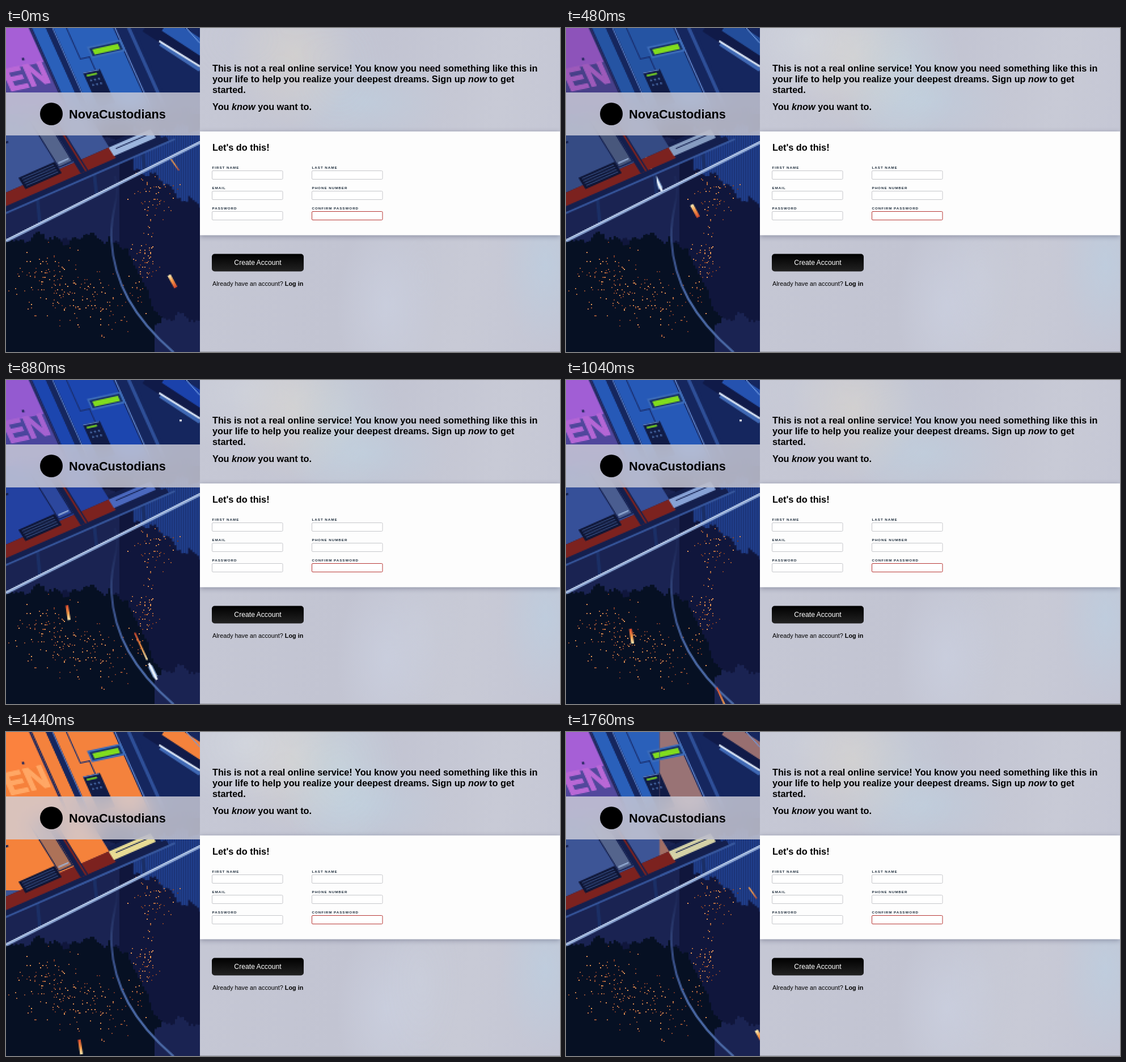
Write an HTML page with a canvas that moves like this. It is 977 by 573 pixels and loops after 1.84 s.

```html
<!DOCTYPE html>
<html lang="en">
<head>
<meta charset="utf-8">
<title>Sign up</title>
<style>
  html, body { margin: 0; width: 100%; height: 100%; overflow: hidden; }
  body { position: relative; background: #c3c5d2; }
  canvas, .banner, .back, .glow, svg { position: absolute; top: 0; left: 0; }
  canvas { width: 342px; height: 574px; image-rendering: pixelated; }
  .banner { top: 114px; width: 342px; height: 76px; background: #d2d3dccc; backdrop-filter: blur(16px); }
  .back, .glow { left: 342px; width: 635px; height: 573px; }
  .back {
    background:
      radial-gradient(ellipse 110px 130px at 165px 50px, #d5d1cdcc, transparent),
      radial-gradient(ellipse 150px 80px at 290px 130px, #bfcfdfaa, transparent),
      radial-gradient(ellipse 80px 150px at 610px 420px, #bccfe1aa, transparent),
      radial-gradient(ellipse 90px 150px at 330px 490px, #cacfdfcc, transparent),
      linear-gradient(100deg, #c6c8d5, #c2c4d2 45%, #c8cad6 75%, #c3c5d4);
  }
  .glow {
    background:
      radial-gradient(ellipse 150px 120px at 80px 20px, #d8dde3aa, transparent),
      radial-gradient(ellipse 110px 150px at 245px 70px, #c6d9e2aa, transparent),
      radial-gradient(ellipse 70px 150px at 390px 440px, #ced3e077, transparent);
  }
  svg { font-family: "Liberation Sans", Arial, sans-serif; }
  .bold { font-weight: 700; font-size: 16.27px; }
  .brand { font-weight: 700; font-size: 21.65px; }
  .label { font-weight: 700; font-size: 6.2px; letter-spacing: 1px; fill: #1c2b3a; }
  .field { fill: #fff; stroke: #c6c7cb; }
  .wrong { stroke: #b83836; }
  .panel { filter: drop-shadow(0 2px 5px #4a506877); }
</style>
</head>
<body>
<div class="back"></div>
<div class="glow" id="glow"></div>
<canvas id="scene" width="171" height="287"></canvas>
<div class="banner"></div>
<svg width="977" height="573" viewBox="0 0 977 573">
  <defs>
    <linearGradient id="black" x2="0" y2="1"><stop stop-color="#000"/><stop offset="1" stop-color="#222"/></linearGradient>
    <clipPath id="right"><path d="M342 170H977V390H342z"/></clipPath>
  </defs>
  <circle cx="80" cy="152" r="20"/>
  <text class="brand" x="111" y="160">NovaCustodians</text>
  <g class="bold">
    <text x="364" y="77">This is not a real online service! You know you need something like this in</text>
    <text x="364" y="96">your life to help you realize your deepest dreams. Sign up <tspan font-style="italic">now</tspan> to get</text>
    <text x="364" y="115">started.</text>
    <text x="364" y="145">You <tspan font-style="italic">know</tspan> you want to.</text>
  </g>
  <g clip-path="url(#right)"><rect class="panel" x="342" y="183" width="635" height="183.5" fill="#fdfdfd"/></g>
  <text class="bold" x="364" y="217">Let's do this!</text>
  <g id="form"></g>
  <rect x="363" y="399.5" width="162" height="31" rx="5" fill="url(#black)"/>
  <text x="444" y="419.3" font-size="12.2" fill="#fff" text-anchor="middle">Create Account</text>
  <text x="364" y="456" font-size="10.8">Already have an account? <tspan font-weight="700">Log in</tspan></text>
  <path d="M342 572.5H977" stroke="#9a9ca8"/>
</svg>
<script>
const LOOP = 1840, STEP = 80;
const ctx = document.getElementById('scene').getContext('2d');
const glow = document.getElementById('glow');

const labels = ['FIRST NAME', 'LAST NAME', 'EMAIL', 'PHONE NUMBER', 'PASSWORD', 'CONFIRM PASSWORD'];
document.getElementById('form').innerHTML = labels.map((label, i) => {
  const x = i % 2 ? 539.5 : 363.5, y = 249 + 36 * (i >> 1);
  return `<text class="label" x="${x}" y="${y}">${label}</text>
    <rect class="field ${i === 5 ? 'wrong' : ''}" x="${x}" y="${y + 3.5}" width="124.5" height="15" rx="1.5"/>`;
}).join('');

const clamp = v => Math.max(0, Math.min(1, v));
const ease = v => clamp(v) ** 2 * (3 - 2 * clamp(v));
const pulse = (t, peak, reach) => ease(1 - Math.abs(t - peak) / reach);
const channels = hex => [1, 3, 5].map(i => parseInt(hex.slice(i, i + 2), 16));
function mix(a, b, amount) {
  const to = channels(b);
  return '#' + channels(a).map((v, i) => Math.round(v + (to[i] - v) * amount).toString(16).padStart(2, '0')).join('');
}

const daylight = { sign: '#a65fd6', under: '#52489c', letters: '#b968d6', door: '#2a60ba', hull: '#3d5596',
  trim: '#54648c', box: '#9db6de', window: '#2858b0' };
const neon = ['sign', 'under', 'letters'];

// Mixes a coloured light into the wall paints; neon can resist it
function lit(paints, light, amount, neonAmount = amount) {
  return Object.fromEntries(Object.entries(paints).map(([name, color]) =>
    [name, mix(color, light, neon.includes(name) ? neonAmount : amount)]));
}

let seed;
const random = () => (seed = (seed * 16807) % 2147483647) / 2147483647;
const spread = () => random() + random() - 1;

function box(color, x, y, w, h) {
  ctx.fillStyle = color;
  ctx.fillRect(x, y, w, h);
}
function line(color, width, x1, y1, x2, y2) {
  ctx.beginPath();
  ctx.moveTo(x1, y1);
  ctx.lineTo(x2, y2);
  ctx.strokeStyle = color;
  ctx.lineWidth = width;
  ctx.stroke();
}
// Draws in axes tilted like the ship: rows climb by slope, columns lean right
function tilted(y, slope, lean, paint) {
  ctx.save();
  ctx.transform(1, slope, lean, 1, 0, y);
  paint();
  ctx.restore();
}

// Ragged cloud bank between two edges
function bank(color, from, to, top, bottom) {
  for (let x = from; x < to; x += 4) {
    const fray = 7 * Math.sin(x / 13) + 5 * Math.sin(x / 5) + 6 * spread();
    const y = top(x) + fray;
    box(color, x, y, 4, bottom(x) - fray - y);
  }
}
function lights(count, x, y, rx, ry, slope = 0) {
  for (let i = 0; i < count; i++) {
    const dx = spread() * rx, dy = spread() * ry + dx * slope;
    const color = mix('#6a3024', '#f4a45c', random() ** 1.5);
    box(color, Math.round((x + dx) / 2) * 2, Math.round((y + dy) / 2) * 2, 2, 2);
  }
}

const railY = x => 377 - .509 * x;

function city() {
  seed = 71;
  box('#10163c', 0, 0, 342, 574);
  bank('#1a2352', 0, 200, () => 190, () => 385);
  bank('#203f8c', 225, 342, () => 180, x => 245 + .6 * (x - 225));
  bank('#061023', 0, 275, x => 372 + 1.8 * Math.max(0, x - 195), () => 590);
  bank('#1a2352', 262, 342, () => 515, () => 590);
  lights(120, 85, 445, 85, 75);
  lights(90, 165, 485, 95, 65);
  lights(60, 245, 405, 30, 60, -1);
  lights(55, 260, 295, 50, 55);

  ctx.beginPath();
  ctx.moveTo(192, 262);
  ctx.bezierCurveTo(204, 300, 183, 320, 186, 375);
  ctx.bezierCurveTo(190, 450, 225, 512, 296, 574);
  const cable = ctx.createLinearGradient(0, 300, 0, 480);
  cable.addColorStop(0, '#1d2858');
  cable.addColorStop(1, '#4a69a6');
  ctx.strokeStyle = cable;
  ctx.lineWidth = 4;
  ctx.stroke();
}

function streak(x, y, dx, dy, width, head = '#fff0b8', tail = '#d8482c') {
  const g = ctx.createLinearGradient(x - dx, y - dy, x + dx, y + dy);
  g.addColorStop(0, tail);
  g.addColorStop(.55, '#f69a48');
  g.addColorStop(1, head);
  line(g, width, x - dx, y - dy, x + dx, y + dy);
}

function traffic(t) {
  // Climbing cars enter at the end of the loop and skip ahead when it restarts
  const climb = t >= 1680 ? t - 2109 : t;
  if (climb < 720) streak(293.5 - .1375 * climb, 448 - .2594 * climb, -6, -11, 6);
  if (climb < 160) streak(298 - .09 * climb, 242 - .123 * climb, -7, -10, 2.5, '#e89a50', '#b85038');

  const fall = t - 640;
  if (fall >= -80) streak(100 + .039 * fall, 349 + .26 * fall, 2, 13, 5);
  if (fall >= -160 && fall < 480) {
    const x = 201 + .2417 * fall, y = 370 + .604 * fall;
    streak(x - 21, y - 44, 11, 24, 3);
    line('#7d9cca', 8, x - 5, y - 9, x + 5, y + 11);
    line('#eef5ff', 4, x - 7, y - 14, x + 7, y + 15);
  }
}

function rail() {
  for (const x of [55, 155, 240]) line('#1b2f66', 6, x, 322 - .46 * x, x + 5, railY(x));
  line('#8ca6d4', 5, 0, railY(0), 342, railY(342));
  line('#c6d6ee', 2, 0, railY(0) - 2, 342, railY(342) - 2);
}

function hull(paint) {
  const navy = '#141f4d', red = '#7c221f';
  box(navy, -40, 19, 310, 9);
  box('#36569c', -40, 27, 320, 3);
  box(navy, 176, -6, 86, 26);
  box(paint.hull, -20, -230, 202, 230);
  box(red, -20, 0, 202, 19);
  box(paint.box, 181, 0, 74, 15);
  box(navy, 190, 5, 56, 1.5);
  box(navy, 94, -90, 26, 88);
  box(paint.trim, 96, -90, 22, 86);
  box('#9db6de', 98, -10, 18, 2);
  box(navy, 120, -120, 13, 139);
  box(red, 128, -120, 3, 139);
  box('#2b70d8', -20, -140, 65, 70);
  box(navy, -20, -71, 67, 3);
  box('#0e1535', 30, -13, 64, 20);
  for (let i = 0; i < 4; i++) box('#34497c', 34, -10 + i * 4, 56, 1.5);
}

function wall(paint) {
  const navy = '#15265e', edge = '#6288d0';
  box(paint.under, -80, 0, 120, 250);
  box(paint.sign, -80, 0, 116, 68);
  box('#24285c', 37, 0, 3, 250);
  box(paint.door, 42, 0, 22, 250);
  box(navy, 64, 0, 12, 250);
  box(edge, 74, 0, 1.5, 250);
  box(paint.door, 76, 0, 97, 250);
  box(navy, 172, 0, 34, 250);
  box(edge, 174, 0, 2, 250);
  box('#2e4f98', 194, 0, 6, 250);

  ctx.font = '700 54px "Liberation Sans", Arial, sans-serif';
  ctx.fillStyle = ctx.strokeStyle = paint.letters;
  ctx.lineWidth = 2;
  ctx.fillText('EN', -40, 103);
  ctx.strokeText('EN', -40, 103);
  box('#20265a', 3, 54, 4, 4);

  box('#1a2f70', 96, 0, 2, 75);
  box('#1a2f70', 96, 75, 18, 2);
  box('#1a2f70', 112, 75, 2, 25);
  box('#3c6cba', 116, 59, 60, 20);
  box('#173266', 119, 62, 53, 14);
  box('#80dc1e', 123, 65, 45, 9);
  box('#111c46', 91, 99, 30, 60);
  box(edge, 91, 99, 28, 1.5);
  box('#74d024', 95, 104, 18, 3);
  for (let i = 0; i < 6; i++) box('#4c6eac', 97 + i % 3 * 7, 113 + (i > 2) * 8, 3, 3);
}

function skylight(paint) {
  line('#101a48', 34, 250, -8, 360, 64);
  line(paint.window, 26, 282, -6, 360, 45);
  line('#6f9ae0', 2, 318, 0, 342, 27);
  line('#3f68b4', 7, 272, 28, 342, 74);
  line('#dce8f8', 3, 270, 23, 342, 68);
}

function clipTo(x, y, w, h, paint) {
  ctx.save();
  ctx.beginPath();
  ctx.rect(x, y, w, h);
  ctx.clip();
  paint();
  ctx.restore();
}

function ship(paint) {
  tilted(291, -.44, .62, () => hull(paint));
  clipTo(0, 0, 342, 152, () => {
    box('#15265e', 0, 0, 342, 152);
    tilted(0, -.22, .45, () => wall(paint));
    skylight(paint);
  });
}

function draw(t) {
  ctx.setTransform(.5, 0, 0, .5, 0, 0);
  city();
  traffic(t);
  rail();
  let paint = lit(daylight, '#0c1428', .62 * pulse(t, 640, 240));
  paint = lit(paint, '#1234a8', .6 * pulse(t, 880, 240), .12 * pulse(t, 880, 240));
  ship(paint);

  // Orange light floods the wall, then drains off to the right
  const flood = t < 1440 ? ease((t - 1240) / 200) : 1 - .45 * ease((t - 1440) / 320);
  if (flood > 0) {
    const warm = lit(paint, '#ff8436', .95 * flood);
    warm.trim = mix(paint.trim, '#ad7258', flood);
    warm.box = mix(paint.box, '#e8dc94', Math.sqrt(flood));
    warm.letters = mix(paint.letters, '#ffa765', flood);
    const edge = 165 * clamp((t - 1440) / 320);
    clipTo(edge, 0, 342, 280, () => ship(warm));
  }
  if (t >= 640 && t <= 1200) box('#fff', 306, 70, 4, 3);
}

let shown = -1;
function tick(now) {
  const t = Math.floor((now % LOOP) / STEP) * STEP;
  if (t !== shown) {
    draw(t);
    glow.style.opacity = .1 + .9 * Math.max(pulse(t, 640, 520), pulse(t, 1520, 400));
    shown = t;
  }
  requestAnimationFrame(tick);
}
tick(performance.now());
</script>
</body>
</html>
```
